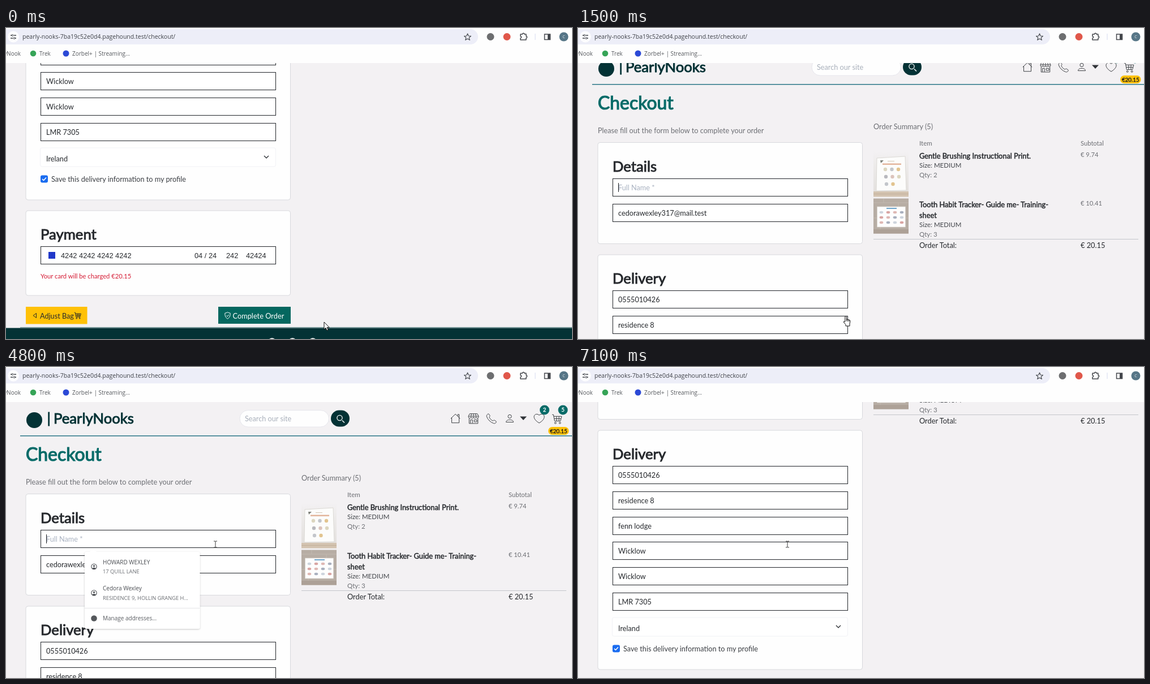
Recreate the animation shown at these times as an HTML page. Size 1000 by 550 pixels, loop 7200 ms.

```html
<!DOCTYPE html>
<html lang="en">
<head>
<meta charset="utf-8">
<title>Checkout</title>
<style>
  html, body { margin: 0; width: 100%; height: 100%; overflow: hidden; background: #f3f1f3; }
  svg { display: block; width: 1000px; height: 550px; }
  text { white-space: pre; font-family: Lato, sans-serif; }
  .ui { font-family: "Open Sans", "Noto Sans", sans-serif; }
  .card-no { font-family: "Liberation Sans", Arial, sans-serif; }
</style>
</head>
<body>
<svg id="stage" viewBox="0 0 1000 550" xmlns="http://www.w3.org/2000/svg"></svg>
<script>
const LOOP = 7200, STEP = 100;
const INK = '#26292d', GREY = '#6d6f74', TEAL = '#066b68', DEEP = '#033235';
const BASE = 12.7, SMALL = 11.2;

// ---- drawing helpers; cy is the middle of the capitals ----
const text = (x, cy, str, size = BASE, fill = INK, extra = '') =>
  `<text x="${x}" y="${cy + size * 0.36}" font-size="${size}" fill="${fill}" ${extra}>${str}</text>`;
const bold = (x, cy, str, size, fill = INK) =>
  text(x, cy, str, size, fill, `stroke="${fill}" stroke-width="${size / 27}"`);
const ui = (x, cy, str, size, fill, extra = '') => text(x, cy, str, size, fill, 'class="ui" ' + extra);
const rect = (x, y, w, h, fill, extra = '') =>
  `<rect x="${x}" y="${y}" width="${w}" height="${h}" fill="${fill}" ${extra}/>`;
const dot = (x, y, r, fill, extra = '') => `<circle cx="${x}" cy="${y}" r="${r}" fill="${fill}" ${extra}/>`;
const line = (d, stroke, width = 1, extra = '') =>
  `<path d="${d}" fill="none" stroke="${stroke}" stroke-width="${width}" stroke-linejoin="round" ${extra}/>`;
const group = (id, body, extra = '') => `<g id="${id}" ${extra}>${body}</g>`;

const ICONS = {
  house: 'M1 8.2 8 1.5l7 6.7M2.5 7v7.5h11V7M11.5 4.5V2h2v4.5',
  shop: 'M2.3 1h11.4l1.8 3.5V6a1.9 1.9 0 0 1-3.75 0A1.9 1.9 0 0 1 8 6a1.9 1.9 0 0 1-3.75 0A1.9 1.9 0 0 1 .5 6V4.5zM1.5 8v7.5h13V8M3.5 15v-5h3v5M9 10h4v3H9zM.5 4.7h15M5 1l-.8 4M11 1l.8 4M8 1v4',
  phone: 'M3.7 1.3l1.6 2.2c.4.6.2 1-.1 1.4L4.5 6c.5 2 3.4 5 5.5 5.5l1.1-.7c.4-.3.9-.4 1.4 0l2.2 1.6c.5.4.5 1 .1 1.4l-1 1c-.7.7-1.8.9-2.8.5C6 13.5 2.5 10 .7 5.3c-.4-1-.1-2 .6-2.7l1-1.2c.4-.5 1-.4 1.4-.1z',
  person: 'M5.4 5a2.6 2.6 0 1 0 5.2 0a2.6 2.6 0 1 0-5.2 0zM2.5 13.5c0-2 2-3.5 5.5-3.5s5.5 1.5 5.5 3.5z',
  heart: 'M8 14.8C-6 6.5 2.5-2 8 3.2c5.5-5.2 14 3.3 0 11.6z',
  cart: 'M.3 1.5h2L4 11h8.7l1.9-7H2.8M3.4 7.5h10.2M7 4v7M10.5 4v7M4 13.8a1.2 1.2 0 1 0 2.4 0a1.2 1.2 0 1 0-2.4 0M10.7 13.8a1.2 1.2 0 1 0 2.4 0a1.2 1.2 0 1 0-2.4 0',
  shield: 'M8 .8c2 1.2 4 1.7 5.7 2C14.2 8 12.5 12.5 8 15.2 3.5 12.5 1.8 8 2.3 2.8 4 2.5 6 2 8 .8zM5.5 8l2 2L11 6.2'
};
const icon = (name, cx, cy, size, color) =>
  line(ICONS[name], color, 16 / size, `transform="translate(${cx - size / 2} ${cy - size / 2}) scale(${size / 16})"`);

const card = (y, h) => rect(35, y + .5, 467.5, h, '#fefefe', 'rx="4" stroke="#d8d9dd"');
const field = (y, value = '') => rect(61.5, y + .5, 415, 31, '#fff', 'stroke="#303338" stroke-width="1.1"') +
  text(71, y + 16, value);

// ---- page parts, laid out for scroll position 0 ----
function header() {
  const badge = (x, n) => dot(x, 76, 8.5, TEAL) + bold(x - 2.7, 76, n, 9.5, '#fff');
  return dot(50, 94, 14, DEEP) +
    bold(72.5, 91, '|', 25.7, DEEP) + bold(84, 91, 'PearlyNooks', 25.7, DEEP) +
    rect(413, 76.5, 157.5, 29.5, '#fefefe', 'rx="14.7" stroke="#e6e6ec"') +
    text(422, 91, 'Search our site', BASE, '#a9b0bb') +
    rect(574, 76.5, 33, 29, DEEP, 'rx="14.5"') +
    line('M594 94.5l4 4', '#fff', 1.5) + dot(589.5, 90, 4.6, 'none', 'stroke="#fff" stroke-width="1.3"') +
    icon('house', 794, 91, 19, '#3d4044') + icon('shop', 826, 91, 19, '#3d4044') +
    icon('phone', 858, 91, 19, '#3d4044') + icon('person', 890, 91, 19, '#3d4044') +
    '<path d="M908 87.5h12l-6 6.500z" fill="#303338"/>' +
    icon('heart', 942, 91, 19, '#3d4044') + icon('cart', 974, 92, 19, '#3d4044') +
    badge(951.5, '2') + badge(984, '5') +
    rect(958, 106, 36.5, 14, '#ffc107', 'rx="7"') + bold(961, 113, '€20.15', 9.8, '#1c1c1c') +
    rect(25, 121, 975, 1.5, '#2b7787');
}

function posterTall() {
  let art = '';
  const tones = ['#dcd6bf', '#c3c6cb', '#e2c48f', '#b9b9be', '#dcc3bb'];
  for (let i = 0; i < 8; i++) {
    const row = Math.floor(i / 3);
    art += dot(543 + (i % 3) * 11.5 + row, 272 + row * 13, 3.2, tones[i % 5]);
  }
  return rect(522, 240, 62, 80, 'url(#wall)') + rect(522, 311, 62, 9.5, '#d3c3b0') +
    rect(522, 315, 62, 1, '#c2b09b') +
    '<path d="M528 252l50-3 2 60-53 1z" fill="#fcfcfb" stroke="#dbd9d5"/>' +
    '<path d="M534 256h6l-5 5z" fill="#7b7e77"/>' +
    rect(547, 257, 12, 1, '#d2c6b4') + rect(538, 261.5, 33, 2.5, '#e3b59c') + art;
}

function posterWide() {
  let art = '';
  const tones = ['#cdd4dd', '#d9a5a3', '#dfb8b4', '#a9b0bf'];
  for (let i = 0; i < 12; i++) {
    const col = i % 4, row = Math.floor(i / 4);
    art += `<ellipse cx="${536 + col * 12}" cy="${348 + row * 9}" rx="3.3" ry="2.2" fill="${tones[(col + row) % 4]}"/>`;
  }
  return rect(522, 323.5, 62, 62, '#b7ada4') + rect(522, 378, 62, 7.5, '#ada197') +
    line('M522 331h62M522 358h62M540 324v7M566 331v27M534 358v20', '#c2b9b0') +
    rect(528.5, 338, 50, 36, '#fdfdfd', 'stroke="#d9d4ce" stroke-width=".8"') +
    rect(545, 340, 18, 2, '#6ea4cb') + art;
}

function summary() {
  return text(522, 196, 'Order Summary (5)', BASE, GREY) +
    text(603, 226, 'Item', 11.6, GREY) + text(888, 226, 'Subtotal', SMALL, GREY) +
    posterTall() + posterWide() +
    bold(603, 248, 'Gentle Brushing Instructional Print.', 12.8) +
    text(603, 265, 'Size: MEDIUM', 11.5, '#43464b') + text(603, 282, 'Qty: 2', 11.5, GREY) +
    text(888, 246, '€ 9.74', SMALL, GREY) +
    bold(603, 334, 'Tooth Habit Tracker- Guide me- Training-', 12.8) + bold(603, 353, 'sheet', 12.8) +
    text(603, 370, 'Size: MEDIUM', 11.5, '#43464b') + text(603, 387, 'Qty: 3', 11.5, GREY) +
    text(888, 332, '€ 10.41', SMALL, GREY) +
    rect(522, 395, 468, 1, '#c3c6cb') +
    text(603, 406, 'Order Total:', 12.8) + text(888, 406, '€ 20.15', 12.8);
}

function forms() {
  const delivery = ['0555010426', 'residence 8', 'fenn lodge', 'Wicklow', 'Wicklow', 'LMR 7305'];
  return bold(35, 155, 'Checkout', 31.9, TEAL) +
    text(35, 203, 'Please fill out the form below to complete your order', BASE, GREY) +
    card(224, 179) + bold(61, 267, 'Details', 25.7) +
    field(288) + field(333, 'cedorawexley317@mail.test') +
    text(71, 304, 'Full Name *', BASE, '#a9b2c1', 'id="hint"') + text(71, 304, '', BASE, INK, 'id="typed"') +
    rect(71, 296, 1, 16, '#1d1f22', 'id="caret"') +
    card(422.5, 423) + bold(61, 465, 'Delivery', 25.7) +
    delivery.map((v, i) => field(Math.round(486.3 + i * 44.7), v)).join('') +
    rect(60.5, 754, 416, 33, '#fff', 'rx="3" stroke="#f1f2f6"') + text(71, 773, 'Ireland') +
    line('M456 768l4 4 4-4', '#303338', 1.4) +
    rect(61, 802.5, 13, 13, '#1a6cf0', 'rx="3"') + line('M64 809l2.5 2.5 4.5-5', '#fff', 1.6) +
    text(80, 809.5, 'Save this delivery information to my profile', BASE, '#3b3e43');
}

function payment() {
  return card(864.5, 150) + bold(61, 907, 'Payment', 25.7) + field(928) +
    rect(75, 938, 12, 12, '#2138c9') +
    [[97, '4242 4242 4242 4242'], [333, '04 / 24'], [389, '242'], [424, '42424']]
      .map(([x, s]) => text(x, 944, s, 12.8, INK, 'class="card-no"')).join('') +
    text(61, 981, 'Your card will be charged €20.15', SMALL, '#d51a33');
}

function actions() {
  return rect(35, 1035, 108.5, 30.5, '#ffc107') + line('M53.5 1046.5v8l-5.5-4z', '#2b2b22') +
    text(60, 1051, 'Adjust Bag') + icon('cart', 127, 1050.5, 13, '#2b2b22') +
    group('idle', rect(375, 1035, 128, 30, '#04675f') + icon('shield', 391.5, 1050.5, 13, '#fff') +
      text(400.5, 1051, 'Complete Order', 12.8, '#fff')) +
    group('hover', rect(374.3, 1035.7, 128, 30, '#f8f8f9', 'stroke="#235f5a" stroke-width="1.4"') +
      icon('shield', 390.5, 1051, 13, '#55585c') + text(399.5, 1051.5, 'Complete Order', 12.8, '#55585c')) +
    group('footer', rect(25, 1071, 975, 1, '#5f8a8a') + rect(0, 1072.5, 1000, 140, DEEP) +
      [470, 506, 542].map(x => dot(x, 1098, 7.7, '#fff')).join(''));
}

function browser() {
  const g = '#44474c';
  return rect(0, 0, 1000, 62, '#fefefe') + rect(-20, 2, 854, 27, '#edeef8', 'rx="13.5"') +
    dot(13, 15.5, 10, '#fdfdff') +
    line('M8 13h2.5M14 13h4M8 18h4M15.5 18h2.5', g, 1.3) +
    dot(11.5, 13, 1.5, 'none', `stroke="${g}"`) + dot(14.5, 18, 1.5, 'none', `stroke="${g}"`) +
    ui(29, 15.5, 'pearly-nooks-7ba19c52e0d4.pagehound.test/checkout/', 10.5, '#3f4248') +
    line('M815.5 10l1.7 4 4.3.3-3.3 2.8 1.1 4.2-3.8-2.3-3.8 2.3 1.1-4.2-3.3-2.8 4.3-.3z', g, 1.2) +
    dot(856, 15.5, 6.5, '#6d6e70') + dot(885, 15.5, 6.5, '#e0574a') +
    line('M909 11h3.5a1.7 1.7 0 0 1 3.4 0h3v3.5a1.7 1.7 0 0 1 0 3.4V21h-10v-3a1.7 1.7 0 0 0 0-3.4z', g, 1.5) +
    rect(934.5, 10, 1, 11, '#d5dcf0') +
    rect(951.5, 11, 10, 9.5, 'none', `stroke="${g}" stroke-width="1.5"`) + rect(957, 11, 5, 9.5, g) +
    dot(985.5, 15.5, 8, '#577687') + ui(985.5, 15.5, 'C', 7, '#e6edf1', 'text-anchor="middle"') +
    ui(26, 45, 'ViewNook', 10, '#56595e', 'text-anchor="end"') +
    dot(48, 45, 5.3, '#36a457') + ui(59, 45, 'Trek', 10, '#56595e') +
    dot(106, 45, 5.5, '#2b49d6') + ui(117, 45, 'Zorbel+ | Streaming...', 10, '#56595e');
}

function suggestions() {
  const entry = (cy, name, place) =>
    dot(155.5, cy + 8, 4.7, 'none', 'stroke="#4c4f54" stroke-width="1.1"') + dot(155.5, cy + 6.8, 1.6, '#4c4f54') +
    `<path d="M152.3 ${cy + 11}q3.2-3 6.4 0l-1.5 1.5h-3.4z" fill="#4c4f54"/>` +
    ui(171, cy, name, 10, '#4a4d52') + ui(171, cy + 17, place, 9.3, '#6a6d72');
  const panel = (h, body) => rect(139, 327, 203.5, h, '#fff', 'rx="3" filter="url(#shade)"') +
    '<path d="M147 327.5l7-5 7 5z" fill="#fff"/>' + body +
    rect(139, 327 + h - 37, 203.5, 1, '#e4e5e8') + dot(155.5, 327 + h - 18.5, 5.3, '#55585c') +
    ui(171, 327 + h - 18.5, 'Manage addresses...', 10, '#5a5d62');
  const owner = cy => entry(cy, 'Cedora Wexley', 'RESIDENCE 9, HOLLIN GRANGE H...');
  return group('full', panel(136, entry(345, 'HOWARD WEXLEY', '17 QUILL LANE') + owner(391.5))) +
    group('short', panel(89, owner(345)));
}

function pointers() {
  return group('arrow', '<path d="M0 0v13l3-2.7 2 4.7 2.2-1-2-4.5h4z" fill="#fff" stroke="#111"/>') +
    group('hand', '<path d="M-1.2 8V.8a1.3 1.3 0 0 1 2.6 0V5l5 1.2q1.7.5 1.5 2.3L7 13v4H0v-2.5L-4 9.8q.6-1.8 2.8-.2zM1.4 5v3.5M3.7 5.7V9M6 6.3V9" fill="#fff" stroke="#111"/>') +
    group('beam', line('M-3-5.5h2.2l.8.7.8-.7h2.2M0-5v10M-3 5.5h2.2l.8-.7.8.7h2.2', '#3a3a3a', 1));
}

document.getElementById('stage').innerHTML =
  `<defs><linearGradient id="wall" x2="0" y2="1"><stop offset="0" stop-color="#f3f1f3"/><stop offset=".3" stop-color="#edebea"/><stop offset="1" stop-color="#e2dfdc"/></linearGradient>
   <filter id="shade" x="-10%" y="-10%" width="120%" height="125%"><feDropShadow dx="0" dy="1" stdDeviation="1.6" flood-opacity=".22"/></filter></defs>` +
  rect(0, 0, 1000, 550, '#f3f1f3') +
  group('page', header() + forms() + payment() + summary() + actions()) +
  browser() + group('popup', suggestions()) + group('pointer', pointers());

// ---- motion ----
const el = id => document.getElementById(id);
const show = (id, on) => el(id).setAttribute('visibility', on ? 'visible' : 'hidden');
const ease = p => p * p * (3 - 2 * p);

// rows are [ms, value, eased]; values are held outside the table
function track(rows, t) {
  if (t <= rows[0][0]) return rows[0][1];
  for (let i = 1; i < rows.length; i++) {
    const [t0, v0] = rows[i - 1], [t1, v1, eased] = rows[i];
    if (t < t1) {
      const p = (t - t0) / (t1 - t0);
      return v0 + (v1 - v0) * (eased ? ease(p) : p);
    }
  }
  return rows[rows.length - 1][1];
}

const SCROLL = [[1000, 542], [1570, 0, true], [6500, 0], [6600, 50], [6700, 130], [6800, 194], [6900, 250], [7000, 292], [7100, 311]];
const POINT_X = [[0, 562], [800, 473, true], [3399, 473], [3400, 372], [4100, 370, true]];
const POINT_Y = [[0, 520], [800, 510, true], [1599, 510], [1600, 513], [3399, 513], [3400, 278], [4100, 313.5, true]];
const POPUP = [[4600, 0], [4700, .5], [4800, 1], [6600, 1], [6700, .8], [6800, 0]];
const KEYS = [5100, 5400, 5600, 5800, 6000, 6200];
const CARET_OFF = [[2100, 2600], [3100, 3400], [4000, 4500], [6600, LOOP]];
const WORD = 'cedora';

function draw(t) {
  const scroll = Math.floor(track(SCROLL, t));
  el('page').setAttribute('transform', `translate(0 ${-scroll})`);

  const x = track(POINT_X, t), y = track(POINT_Y, t);
  const hover = t <= 1100 && x < 503;
  const hand = t < 1600 && x < 503;
  const beam = t >= 1600 && (t < 3400 || y > 288);
  el('pointer').setAttribute('transform', `translate(${x} ${y})`);
  show('hand', hand);
  show('beam', beam);
  show('arrow', !hand && !beam);

  show('hover', hover);
  show('idle', !hover);
  el('footer').setAttribute('transform', `translate(0 ${hover ? 1.5 : 0})`);

  const typed = WORD.slice(0, KEYS.filter(k => t >= k).length);
  el('typed').textContent = typed;
  show('hint', !typed);
  el('caret').setAttribute('x', typed ? Math.round(71 + el('typed').getComputedTextLength()) : 71);
  show('caret', !CARET_OFF.some(([a, b]) => t >= a && t < b));

  el('popup').setAttribute('opacity', track(POPUP, t));
  show('full', t < 5200);
  show('short', t >= 5200);
}

const start = performance.now();
function tick() {
  const t = (performance.now() - start) % LOOP;
  draw(Math.floor(t / STEP) * STEP);
  requestAnimationFrame(tick);
}
tick();
</script>
</body>
</html>
```
